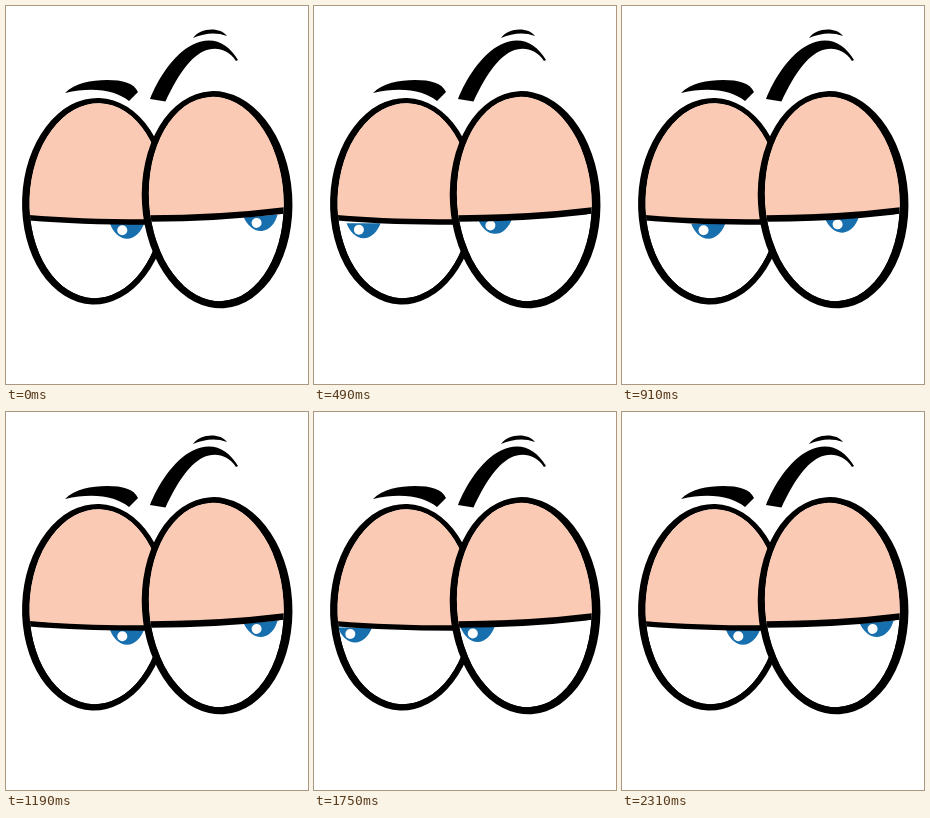
An HTML page for the animation above (2.38 s loop, 302 px wide and 378 px high).

```html
<!DOCTYPE html>
<html lang="en">
<head>
<meta charset="utf-8">
<title>Shifty eyes</title>
<style>
html, body { margin: 0; height: 100%; overflow: hidden; background: #fff; }
svg { display: block; width: 100%; height: 100%; }
</style>
</head>
<body>
<svg viewBox="0 0 302 378">
  <defs>
    <ellipse id="ballL" cx="90.5" cy="194.700" rx="67" ry="97.500" transform="rotate(2 90.5 194.7)"/>
    <ellipse id="ballR" cx="210.300" cy="193" rx="67.300" ry="102.300" transform="rotate(-3.5 210.3 193)"/>
    <clipPath id="clipL"><use href="#ballL"/></clipPath>
    <clipPath id="clipR"><use href="#ballR"/></clipPath>
    <g id="iris">
      <path d="M-17 0H17C14 8 8 15 0 15S-14 8-17 0Z" fill="#176fae"/>
      <circle cx="-4.7" cy="6.5" r="5" fill="#fff"/>
    </g>
  </defs>

  <path d="M59 87C69 77 85 74 101 74C117 74 128 77 132 86L123 95C111 85 88 80 59 87Z"/>
  <path d="M144 93C151 75 167 48 187 38.500C206 29 222 37 232 54L230 55C222 43 209 40 197 45.500C182 53 170 73 159.500 95.500Z"/>
  <path d="M187 32C193 22 214 20 221 30C210 26 199 27 187 32Z"/>

  <ellipse cx="89.700" cy="195.200" rx="73.600" ry="103.300" transform="rotate(2 89.7 195.2)"/>
  <g clip-path="url(#clipL)">
    <use href="#ballL" fill="#fff"/>
    <use href="#iris" id="irisL"/>
    <path d="M20 80H170V216H140Q70 216 20 211.500Z" fill="#facab4"/>
    <path d="M20 211.500Q70 216 140 216H170" fill="none" stroke="#000" stroke-width="5.4"/>
  </g>

  <ellipse cx="211.100" cy="193.700" rx="75.200" ry="108.700" transform="rotate(-3.5 211.1 193.7)"/>
  <g clip-path="url(#clipR)">
    <use href="#ballR" fill="#fff"/>
    <use href="#iris" id="irisR"/>
    <path d="M140 80H282V204Q215 212.500 140 212.500Z" fill="#facab4"/>
    <path d="M140 212.500Q215 212.500 282 204" fill="none" stroke="#000" stroke-width="6.6"/>
  </g>
</svg>
<script>
const STEP = 70, STEPS = 17, HALF = 8;

const irisL = document.getElementById("irisL");
const irisR = document.getElementById("irisR");

function place(iris, x, y, tilt) {
  iris.setAttribute("transform", `translate(${x} ${y}) rotate(${tilt})`);
}

function draw() {
  const step = Math.floor(performance.now() / STEP) % STEPS;
  const sweep = 1 - Math.abs(step - HALF) / HALF;
  const look = sweep ** 0.85;   // 0 = far right, 1 = far left
  const edge = sweep ** 12;     // extra shift only at the far left
  const x = 121 - 80 * look;
  place(irisL, x, 217.7 - 2.2 * edge, 0);
  place(irisR, x + 133.7 - 11.2 * edge, 210 + 2.5 * Math.sqrt(look) + 2.5 * edge, -5 * (1 - look));
  requestAnimationFrame(draw);
}
draw();
</script>
</body>
</html>
```
